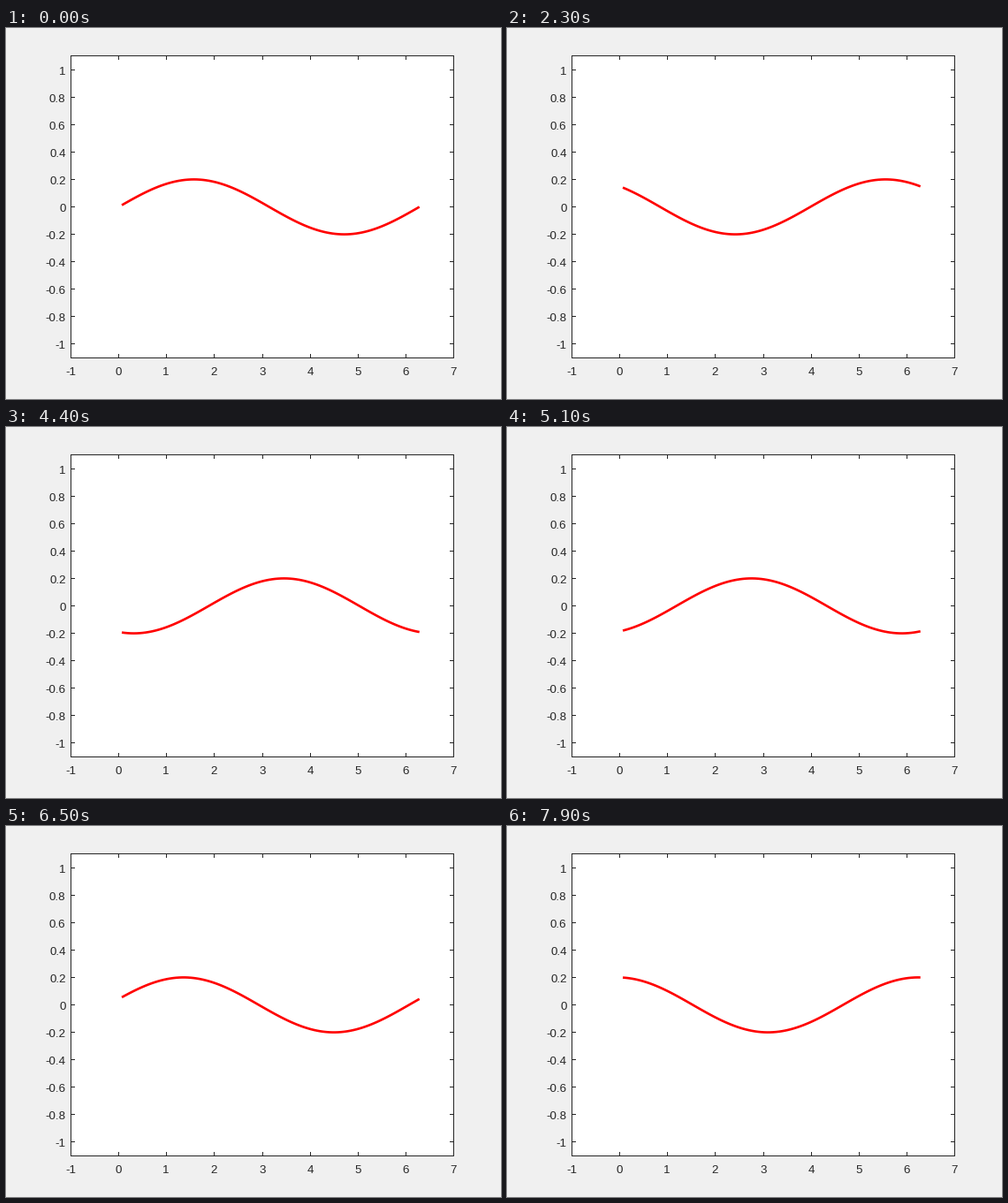
A matplotlib script that plays this animation: 560 px wide and 420 px high, repeating every 8 s.

```python
import numpy as np
import matplotlib.pyplot as plt
from matplotlib.animation import FuncAnimation

W, H, DPI = 560, 420, 80
PT = 72 / DPI                       # points per pixel
LEFT, RIGHT, TOP, BOTTOM = 73.5, 506.5, 31.5, 373.5
XMIN, XMAX, YMIN, YMAX = -1, 7, -1.1, 1.1
TICK = 4.5
INK = (0.15, 0.15, 0.15)
FRAMES, INTERVAL, STEP = 80, 100, 0.1

plt.rcParams["font.family"] = "Liberation Sans"


def to_x(v):
    return LEFT + (v - XMIN) / (XMAX - XMIN) * (RIGHT - LEFT)


def to_y(v):
    return BOTTOM - (v - YMIN) / (YMAX - YMIN) * (BOTTOM - TOP)


def crisp(p):
    """Centre of the pixel that holds a tick."""
    return np.round(p - 0.5) + 0.5


fig = plt.figure(figsize=(W / DPI, H / DPI), dpi=DPI, facecolor="#f0f0f0")
ax = fig.add_axes([0, 0, 1, 1])
ax.set_xlim(0, W)
ax.set_ylim(H, 0)
ax.axis("off")


def hairline(xs, ys):
    ax.plot(xs, ys, color=INK, lw=PT, snap=False, zorder=2,
            solid_capstyle="butt", solid_joinstyle="miter")


def label(x, y, value, align):
    ax.text(x, y, f"{value:g}", color=INK, size=13.33 * PT,
            ha=align, va="baseline")


ax.fill([LEFT, RIGHT, RIGHT, LEFT], [TOP, TOP, BOTTOM, BOTTOM],
        color="white", lw=0, zorder=1)
hairline([LEFT, RIGHT, RIGHT, LEFT, LEFT, RIGHT],
         [TOP, TOP, BOTTOM, BOTTOM, TOP, TOP])

for v in range(XMIN, XMAX + 1):
    x = crisp(to_x(v))
    hairline([x, x], [BOTTOM, BOTTOM - TICK])
    hairline([x, x], [TOP, TOP + TICK])
    label(x - 0.5, 393, v, "center")

for k in range(-5, 6):
    y = crisp(to_y(k / 5))
    hairline([LEFT, LEFT + TICK], [y, y])
    hairline([RIGHT, RIGHT - TICK], [y, y])
    label(67.5, y + 5.5, k / 5, "right")

theta = np.linspace(0, 2 * np.pi, 101)[1:]
wave, = ax.plot([], [], color="red", lw=2.67 * PT, zorder=3,
                solid_capstyle="butt", solid_joinstyle="round")


def draw(i):
    wave.set_data(to_x(theta), to_y(0.2 * np.sin(theta + STEP * i)))
    return wave,


anim = FuncAnimation(fig, draw, frames=FRAMES, interval=INTERVAL,
                     repeat=True, repeat_delay=0)
plt.show()
```
